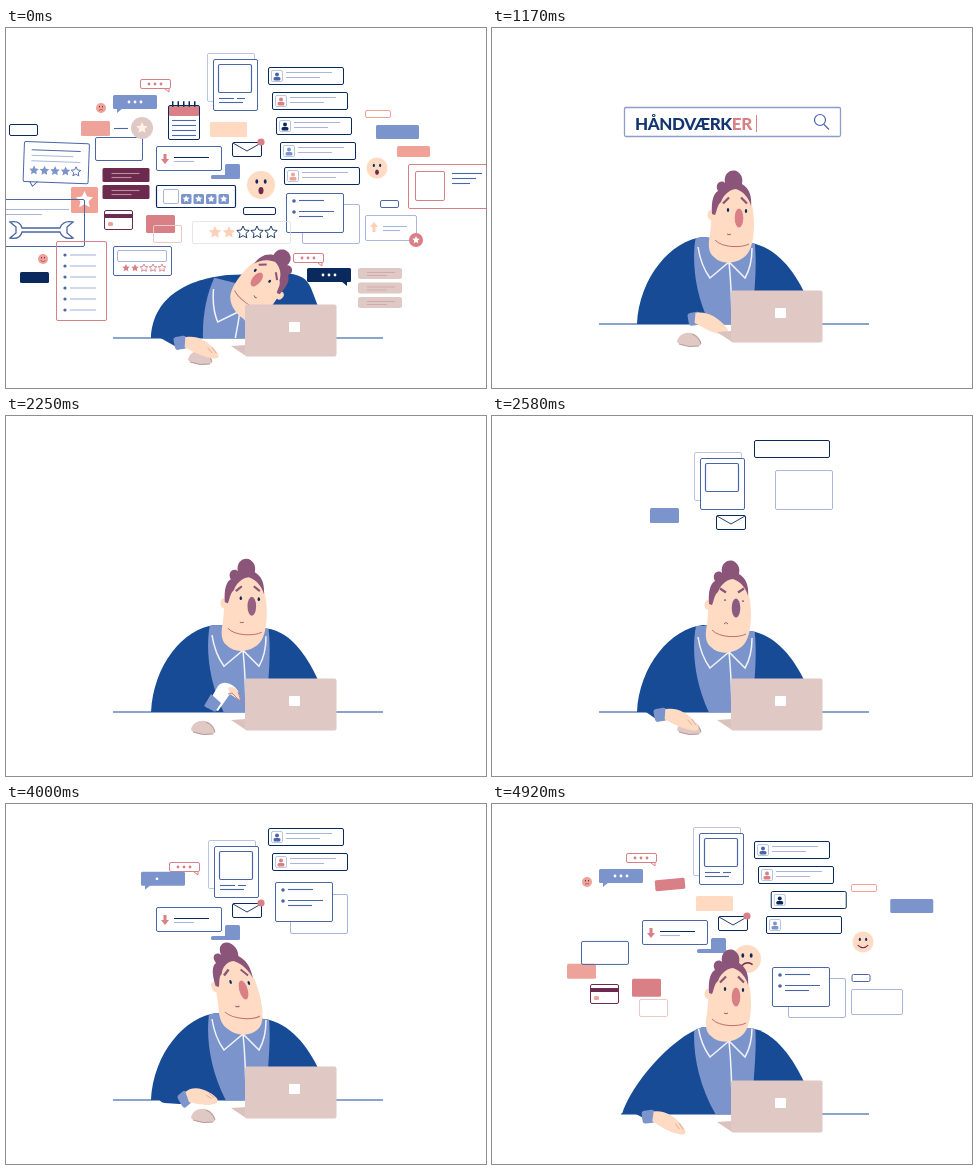
Animation of 480 by 360 pixels, one loop 5 s. Source, as an HTML page with a canvas:

```html
<!DOCTYPE html>
<html lang="da">
<head>
<meta charset="utf-8">
<title>Søgning</title>
<style>
  html, body { margin: 0; width: 100%; height: 100%; overflow: hidden; background: #fff; }
  canvas { position: absolute; left: 0; top: 0; width: 480px; height: 360px; }
  #query {
    position: absolute; left: 143px; top: 80.5px;
    font: 800 17px/29px Lato, sans-serif; letter-spacing: -.4px; color: #12346f; white-space: nowrap;
  }
  #fresh { color: #d97f86; }
  #caret {
    display: inline-block; width: 1.5px; height: 17px; margin-left: 4px;
    vertical-align: -2px; background: #12346f;
  }
</style>
</head>
<body>
<canvas id="stage"></canvas>
<div id="query"><span id="typed"></span><span id="fresh"></span><span id="caret"></span></div>
<script>
const LOOP = 5000, STEP = 1000 / 12, WORD = 'HÅNDVÆRKER';
const BLUE = '#184b95', SHIRT = '#7b94cc', SKIN = '#ffdbc4', HAIR = '#8a5578', PINK = '#d97f86',
  SALMON = '#f2a196', SAND = '#e0c8c4', NAVY = '#0a2a5e', INK = '#4a66a6', WINE = '#6b2a4e',
  PALE = '#a9b6da', WHITE = '#fff';

const $ = id => document.getElementById(id);
const canvas = $('stage'), g = canvas.getContext('2d'), dpr = window.devicePixelRatio || 1;
canvas.width = 480 * dpr;
canvas.height = 360 * dpr;

const clamp = v => Math.max(0, Math.min(1, v));
const ease = v => v * v * (3 - 2 * v);
const ramp = (k, a, b) => ease(clamp((k - a) / (b - a)));
const pulse = (k, a, b, c, d) => ramp(k, a, b) - ramp(k, c, d);
const times = (n, fn) => { for (let i = 0; i < n; i++) fn(i); };

/* ---- drawing helpers ---- */
function local(x, y, draw, rot = 0, sx = 1, sy = sx) {
  g.save();
  g.translate(x, y);
  g.rotate(rot * Math.PI / 180);
  g.scale(sx, sy);
  draw();
  g.restore();
}

function stroke(path, color, width = 1) {
  g.strokeStyle = color;
  g.lineWidth = width;
  g.stroke(typeof path === 'string' ? new Path2D(path) : path);
}

function fill(path, color) {
  g.fillStyle = color;
  g.fill(typeof path === 'string' ? new Path2D(path) : path);
}

function outline(x, y, w, h, color, p = 1, width = 1) {
  if (p <= 0) return;
  const path = new Path2D(), len = 2 * (w + h);
  path.roundRect(x + .5, y + .5, w - 1, h - 1, 1.5);
  if (p < 1) g.setLineDash([len * p, len]);
  stroke(path, color, width);
  g.setLineDash([]);
}

function block(x, y, w, h, color, p = 1, r = 1.5) {
  if (p <= 0) return;
  const path = new Path2D();
  path.roundRect(x + w * (1 - p) / 2, y + h * (1 - p) / 2, w * p, h * p, r);
  fill(path, color);
}

function line(x, y, len, color, p = 1, width = 1.1) {
  if (p > 0) stroke(`M${x},${y + .5}h${len * p}`, color, width);
}

function oval(x, y, rx, ry, color) {
  const path = new Path2D();
  path.ellipse(x, y, rx, ry, 0, 0, 7);
  fill(path, color);
}
const dot = (x, y, r, color) => oval(x, y, r, r, color);

function star(x, y, r, color, solid = true) {
  const path = new Path2D();
  times(10, i => {
    const a = i * Math.PI / 5, d = i % 2 ? r * .48 : r;
    path.lineTo(x + d * Math.sin(a), y - d * Math.cos(a));
  });
  path.closePath();
  solid ? fill(path, color) : stroke(path, color, .9);
}

const dots = (x, y, color, p) => times(3, i => p > i / 3 && dot(x + i * 6, y, 1.4, color));
const stars = (x, y, gap, r, full, color, empty, p) => times(5, i =>
  p > i / 5 && star(x + i * gap, y, r, i < full ? color : empty, i < full));
const arrow = (x, y, color, dir) =>
  fill(`M${x - 1.5},${y - 5 * dir}h3v${5 * dir}h2.5l-4,${5 * dir}l-4,${-5 * dir}h2.5z`, color);

/* ---- things in the air ----
   p: growth of the shape, q: growth of its contents.
   at: first step, from: offset on entry, stage: offset until the scene sinks. */
const items = [];
const add = (x, y, draw, { at = Infinity, from = [0, 0], stage = [0, 0] } = {}) =>
  items.push({ x, y, draw, at, from, stage });

const solid = (w, h, color) => p => block(0, 0, w, h, color, p);
const frame = (w, h, color) => p => outline(0, 0, w, h, color, p);

const profile = tint => (p, q) => {
  outline(0, 0, 76, 18, NAVY, p);
  if (q <= 0) return;
  outline(3, 3, 12, 12, PALE, 1, .8);
  dot(9, 7.5, 2, tint);
  block(5.5, 10, 7, 3.5, tint);
  line(18, 5, 46, PALE, q * 2 - 1);
  line(18, 10, 34, PALE, q * 2 - 1);
};
const emoji = (r, mood, color) => (p, q, k) => local(0, 0, () => {
  dot(0, 0, 10, color);
  oval(-3, -2.5, 1, 1.6, NAVY);
  oval(3, -2.5, 1, 1.6, NAVY);
  if (k < 8 && r > 6) oval(0, 4, 1.8, 2.6, WINE);
  else stroke(mood === 'sad' ? 'M-4,5Q0,1 4,4' : 'M-5,3Q0,8 5,3', WINE);
}, 0, r / 10 * p);
const chat = (p, q) => {
  outline(0, 0, 31, 10, PINK, p);
  stroke('M25,10l4,3v-3', PINK);
  dots(9, 5, PINK, q);
};
const bubble = (color, tail) => (p, q) => {
  block(0, 0, 44, 14, color, p);
  if (p >= 1) fill(tail, color);
  dots(16, 7, WHITE, q);
};

add(207, 31, (p, q) => {
  outline(-6, -6, 48, 49, PALE, p, .8);
  block(0, 0, 45, 52, WHITE, p);
  outline(0, 0, 45, 52, INK, p);
  outline(5, 5, 34, 29, INK, p, 1.2);
  line(6, 39, 15, INK, q); line(24, 39, 8, INK, q); line(6, 43, 24, INK, q);
}, { at: 28, stage: [1, 26] });
[INK, PINK, NAVY, SHIRT, SALMON].forEach((tint, i) => add(262 + 4 * i, 39 + 25 * i, profile(tint),
  i < 4 ? { at: i < 2 ? 28 + 6 * i : 54, from: [5 * (i % 3), 0] } : {}));
add(296, 176, frame(58, 40, PALE), { at: 28, from: [-1, -36], stage: [-12, -71] });
add(280, 165, (p, q) => {
  block(0, 0, 58, 40, WHITE, p);
  outline(0, 0, 58, 40, INK, p);
  times(2, i => {
    if (q > i * .4) dot(8, 8 + i * 11, 1.8, INK);
    line(13, 7 + i * 11, 25 + i * 10, INK, q);
  });
  line(13, 23, 24, INK, q * 2 - 1);
}, { at: 34, stage: [-11, -72] });
add(205, 136, (p, q, k) => {
  const notch = 14 * (k < 8 ? 1 : ramp(k, 37, 46));
  block(notch, 0, 29 - notch, 15, SHIRT, p);
  block(0, 11, 20, 4, SHIRT, p);
}, { at: 28, from: [-47, -29] });
add(226, 114, (p, q) => {
  outline(0, 0, 30, 15, NAVY, p);
  stroke('M1,1l14,8l14,-8', NAVY, .9);
  dot(29, 0, 3.6 * q, PINK);
}, { at: 28, from: [-2, 0] });
add(134, 51, chat, { at: 34, from: [-13, 16], stage: [29, 22] });
add(107, 67, bubble(SHIRT, 'M4,13h6l-6,5z'), { at: 43, from: [0, 1], stage: [28, 15] });
add(150, 118, (p, q) => {
  outline(0, 0, 66, 25, INK, p);
  if (q > 0) arrow(9, 13, PINK, 1);
  line(18, 11, 35, NAVY, q); line(18, 15, 20, PALE, q);
}, { at: 36, from: [-17, 0] });
add(95, 80, emoji(5, 'sad', SALMON), { at: 53 });
add(204, 94, solid(37, 15, '#ffd9c0'), { at: 51 });
add(162, 77, (p, q) => {
  local(16, 5, () => block(-15, -5, 30, 11, PINK, p), -5 * (1 - q));
  if (q <= .8) return;
  outline(0, 0, 32, 35, NAVY, q);
  times(5, i => block(4 + i * 5.5, -4, 1.5, 6, NAVY));
  times(4, i => line(4, 15 + i * 5, 24, INK));
}, { at: 55 });
add(255, 157, emoji(14, 'sad', SKIN), { at: 53 });
add(371, 140, emoji(10.5, 'happy', SKIN), { at: 52 });
add(370, 97, solid(43, 14, SHIRT), { at: 50, from: [109, 0] });
add(75, 93, solid(29, 15, '#eda39a'), { at: 52, from: [0, 118] });
add(89, 109, frame(48, 24, INK), { at: 55, from: [0, 31] });
add(98, 182, (p, q) => {
  outline(0, 0, 29, 20, WINE, p);
  block(0, 4, 29, 4, WINE, p, 0);
  if (q > 0) block(4, 12, 5, 4, SALMON);
}, { at: 53 });
add(140, 187, solid(29, 18, PINK), { at: 53, from: [0, -14] });
add(147, 197, frame(29, 18, '#edc9c6'), { at: 54 });
add(359, 82, frame(26, 8, SALMON), { at: 55 });
add(374, 172, frame(19, 8, INK), { at: 55, from: [-15, 0] });
add(359, 187, (p, q) => {
  outline(0, 0, 52, 26, PALE, p);
  if (q <= .7) return;
  arrow(9, 12, '#ffd0b8', -1);
  line(18, 11, 24, PALE); line(18, 15, 17, PALE);
  dot(51, 25, 7 * q, PINK);
  star(51, 25, 4, WHITE);
}, { at: 56 });

// Only seen at the height of the clutter.
add(3, 96, frame(29, 12, NAVY));
add(136, 100, p => {
  line(-28, 0, 14, INK, p);
  dot(0, 0, 11 * p, SAND);
  star(0, 0, 6 * p, '#fff1ea');
});
add(391, 118, solid(33, 11, SALMON));
add(402, 136, (p, q) => {
  outline(0, 0, 86, 45, PINK, p);
  outline(7, 7, 30, 30, PINK, p);
  times(3, i => line(44, 9 + i * 5, 30 - i * 6, INK, q));
});
add(18, 113, (p, q) => local(0, 0, () => {
  outline(0, 0, 66, 41, INK, p);
  stroke('M7,40l3,5l5,-5', INK);
  times(3, i => line(8, 8 + i * 5.5, 49 - i % 2 * 7, i ? PALE : INK, q));
  stars(11, 29, 10.5, 5, 4, SHIRT, INK, q);
}, 2));
times(2, i => add(96.5, 140 + 17 * i, (p, q) => {
  block(0, 0, 47, 14, WINE, p);
  line(9, 5, 28, '#c08a9c', q); line(9, 9, 20, '#c08a9c', q);
}));
add(65, 159, p => { block(0, 0, 27, 26, SALMON, p); star(13.5, 13, 9 * p, WHITE); });
add(150, 157, (p, q) => {
  outline(0, 0, 80, 23, NAVY, p, 1.2);
  outline(7, 4, 16, 15, PALE, p);
  times(4, i => {
    block(25 + i * 12.5, 9, 10.5, 10, SHIRT, q);
    if (q > .8) star(30.2 + i * 12.5, 14, 3.8, WHITE);
  });
});
add(237, 179, frame(33, 8, NAVY));
add(0, 171, (p, q) => {
  outline(-8, 0, 87, 48, INK, p);
  line(0, 10, 63, PALE, q); line(0, 15, 36, PALE, q);
  if (q > 0) stroke('M4,23q10,-2 12,6h38q3,-8 13,-6l-6,5v6l6,5q-10,2 -13,-6h-38q-2,8 -12,6l6,-5v-6z', INK, 1.3);
});
add(186, 193, (p, q) => {
  outline(0, 0, 99, 23, '#e4dde6', p, .8);
  stars(23, 11.5, 14, 6.5, 2, '#ffd0b8', NAVY, q);
});
add(50, 213, (p, q) => {
  outline(0, 0, 51, 80, PINK, p);
  times(6, i => {
    if (q > i / 6) dot(9, 14 + i * 11, 1.6, INK);
    line(14, 13.5 + i * 11, 26, PALE, q);
  });
});
add(37, 231, emoji(5, 'happy', SALMON));
add(14, 244, solid(29, 11, NAVY));
add(107, 218, (p, q) => {
  outline(0, 0, 59, 30, INK, p);
  outline(4, 4, 50, 12, PALE, p);
  stars(13, 22, 9, 4, 2, PINK, PINK, q);
});
add(287, 225, chat);
add(301, 240, bubble(NAVY, 'M34,13h6v5z'));
times(3, i => add(352, 240 + 14.5 * i, (p, q) => {
  block(0, 0, 44, 11, SAND, p, 2);
  line(9, 4, 28, '#c9a5a5', q, .8); line(9, 7, 20, '#c9a5a5', q, .8);
}));

function drawItems(k, { sink }) {
  const home = k < 8, settle = 1 - ramp(k, 50, 59);
  items.forEach(({ x, y, draw, at, from, stage }, i) => {
    if (home) {
      const p = 1 - clamp((k - i * 7 % 4 * .8) / 3.2);
      if (p > 0) local(x, y, () => draw(p, clamp(p * 2 - 1), k));
    } else if (k >= at) {
      const entry = 1 - ramp(k, at + 3, at + 12);
      local(x + from[0] * entry + stage[0] * settle,
        y + from[1] * entry + stage[1] * settle - 15 + 13 * sink,
        () => draw(clamp((k - at + 1) / 4), clamp((k - at - 4) / 5), k));
    }
  });
}

/* ---- the man, driven by a few moods ---- */
function pose(k) {
  const lean = 1 - ramp(k, 0, 5);
  const drop = ramp(k, 52, 59);
  return {
    lean, drop,
    sink: lean + drop,
    desk: 296 + 14 * (lean + drop),
    lift: pulse(k, 15, 20, 25, 30),
    angry: pulse(k, 26, 31, 34, 39),
    wary: pulse(k, 15, 31, 39, 46),
    tilt: pulse(k, 39, 46, 51, 58),
    chinX: 240 - 3 * ramp(k, 24, 31) + lean,
    chinY: 217 + 57 * lean + 3 * drop + 2 * pulse(k, 26, 31, 34, 39) - 4 * pulse(k, 39, 46, 51, 58),
    left: 145 - 15 * drop,
  };
}

const FACE = new Path2D('M-20,-34C-19,-50 -10,-58 3,-58C16,-58 22,-42 22,-22C22,-8 20,2 16,8C8,19 -10,21 -18,12C-24,8 -24,-2 -22,-10Z');
const LOCKS = new Path2D('M-20,-31C-21,-45 -18,-52 -14,-54C-18,-61 -11,-66 -7,-62C-9,-72 0,-77 6,-73C10,-70 11,-66 10,-61C17,-57 20,-49 19,-39C17,-47 12,-53 4,-56C-4,-55 -9,-49 -11,-43C-15,-40 -15,-34 -17,-30Z');
const TOP = new Path2D('M-33,-26C-38,0 -34,38 -13,74H24C22,45 30,10 25,-26Z');
const COLLAR = new Path2D('M-31,-15Q-28,4 -19,16L0,0L16,16Q23,4 23,-14M0,0Q3,30 3,70');
const HAND = new Path2D('M-1,-5C10,-8 20,-3 27,3C33,8 36,13 31,14C20,15 8,9 -1,5Z');

function drawBody({ left, desk, lean, drop, sink, lift, chinY }) {
  const ax = 211 + 11 * lean - 3 * lift, ay = 209 + 14 * sink + 24 * lean;
  const bx = 258 + 22 * lean + 4 * lift, by = 215 + 9 * sink + 21 * lean - 4 * lift;
  const body = new Path2D(`M${left},${desk}C${left + 2 + 6 * drop},${desk - 46 + 18 * drop}
    ${ax - 32},${ay + 3 + 7 * drop} ${ax},${ay}L${bx},${by}
    C${bx + 26},${by + 3} 303,${desk - 52} 313,${desk - 30}V${desk}Z`);
  fill(body, BLUE);
  g.save();
  g.clip(body);
  local(237 - 3 * lean, chinY + 17 - 8 * lean, () => {
    fill(TOP, SHIRT);
    stroke(COLLAR, '#f2f3fa', 1.5);
  }, lean * 14);
  g.restore();
}

function drawHead({ chinX, chinY, lean, angry, wary, tilt }) {
  local(chinX, chinY, () => {
    g.transform(1, 0, .24 * tilt, 1, 0, 0);
    oval(-21, -30, 3.5, 5, SKIN);
    fill(FACE, SKIN);
    fill(LOCKS, HAIR);
    stroke('M-17,-5C-10,3 10,3 17,-1', '#bf6f70', 1);
    const brow = 2.5 - 5 * angry;
    stroke(`M-9,${-44 + brow}L-3,${-45 - brow}M9,${-45 - brow}L15,${-44 + brow}`, HAIR, 2.2);
    const open = 2 - 1.5 * angry;
    oval(-4, -35, 1.2, open, NAVY);
    oval(14, -34, 1.2, open, NAVY);
    oval(7, -27, 4.3, 9.5, `rgb(${217 - 79 * wary},${127 - 37 * wary},${134 - 6 * wary})`);
    stroke(`M-5,-11q2,${1.5 - 4.5 * angry} 4,0`, '#9c6070');
  }, 40 * lean, lean > .5 ? -1 : 1, 1 - .13 * lean);
}

const drawCuff = () => local(0, 0, () => block(-8, -6, 13, 13, SHIRT, 1, 3), -15);

function drawMouse({ desk, lean, drop }) {
  local(197 - 17 * drop - 3 * lean, desk + 15 - 3 * drop + 4 * lean, () => {
    fill('M-12,3C-11,-4 -4,-7 2,-6C9,-5 13,2 12,6C6,9 -8,8 -12,3Z', SAND);
    stroke('M3,-5Q10,-2 12,5M-10,5Q0,9 10,7', '#a98a92', .8);
  }, 0, 1 - .6 * drop);
}

function drawRestingHand({ left, desk, lean, drop, tilt }) {
  const x = 170 + 9 * tilt - 12 * drop + 6 * lean, y = desk + 2 - 4 * tilt + 2 * lean;
  g.lineCap = 'round';
  stroke(`M${left + 10 + 4 * tilt},${desk - 6 + 2 * tilt}L${x - 5},${y - 1}`, BLUE, 11 + 3 * tilt - 4 * drop);
  g.lineCap = 'butt';
  local(x, y, () => {
    drawCuff();
    local(4, 0, () => {
      fill(HAND, SKIN);
      stroke('M22,4l5,5M26,3l5,6', '#d9a59a', .8);
    });
  }, 4 - 24 * tilt + 4 * drop, 1 - .2 * tilt, 1 + .1 * tilt);
}

function drawTypingHand(raised) {
  local(204, 290, () => {
    if (!raised) {
      drawCuff();
      return fill(HAND, SKIN);
    }
    fill('M-4,1L8,-20C14,-27 24,-22 28,-15L31,-5L20,-12L8,5Z', WHITE);
    fill('M18,-18C25,-22 29,-14 31,-5L27,-9L20,-12Z', SKIN);
    stroke('M18,-12l4,-1l5,5l4,3l-3,-9', '#b77b82', .9);
    fill('M-6,0L1,-12L11,-3L5,6Z', SHIRT);
  }, raised ? 0 : 5);
}

function drawLaptop({ desk }) {
  fill(`M225,${desk + 8}L240,${desk + 7}V${desk + 18}Z`, '#dcc2be');
  block(239, desk - 33.5, 91.5, 52, SAND, 1, 2);
  block(283, desk - 16, 11, 10, WHITE, 1, 1);
}

function drawSearch(k) {
  const p = clamp((k - 5) / 3) * clamp((27 - k) / 3), typing = k < 16;
  outline(132, 79, 217, 30, '#8e9dc8', p, 1.3);
  if (p >= 1) {
    const lens = new Path2D('M332,96.500l5,5');
    lens.moveTo(333.5, 92);
    lens.arc(328, 92, 5.5, 0, 7);
    stroke(lens, INK, 1.2);
  }
  const n = Math.max(0, Math.min(WORD.length, Math.round((k - 7) * 10 / 7)));
  const fresh = typing ? Math.min(2, n) : 0;
  $('typed').textContent = WORD.slice(0, n - fresh);
  $('fresh').textContent = WORD.slice(n - fresh, n);
  $('query').style.visibility = p < 1 ? 'hidden' : 'visible';
  $('caret').style.background = typing ? PINK : '#12346f';
  $('caret').style.opacity = k > 14 && (k - 14 >> 2) % 2 ? 0 : 1;
}

function render(k) {
  const man = pose(k), typing = k >= 5 && k < 28;
  g.setTransform(dpr, 0, 0, dpr, 0, 0);
  g.clearRect(0, 0, 480, 360);
  drawItems(k, man);
  line(107 + 22 * man.drop, man.desk - .5, 270 - 22 * man.drop, BLUE);
  drawBody(man);
  drawHead(man);
  drawMouse(man);
  typing ? drawTypingHand(k % 2 || k > 17) : drawRestingHand(man);
  drawLaptop(man);
  drawSearch(k);
}

const start = performance.now();
let shown = -1;
function tick(now) {
  const ms = Math.max(0, now - start) % LOOP;
  const k = Math.floor((ms + 3.4) / STEP) % 60;
  if (k !== shown) render(shown = k);
  requestAnimationFrame(tick);
}
tick(start);
</script>
</body>
</html>
```
